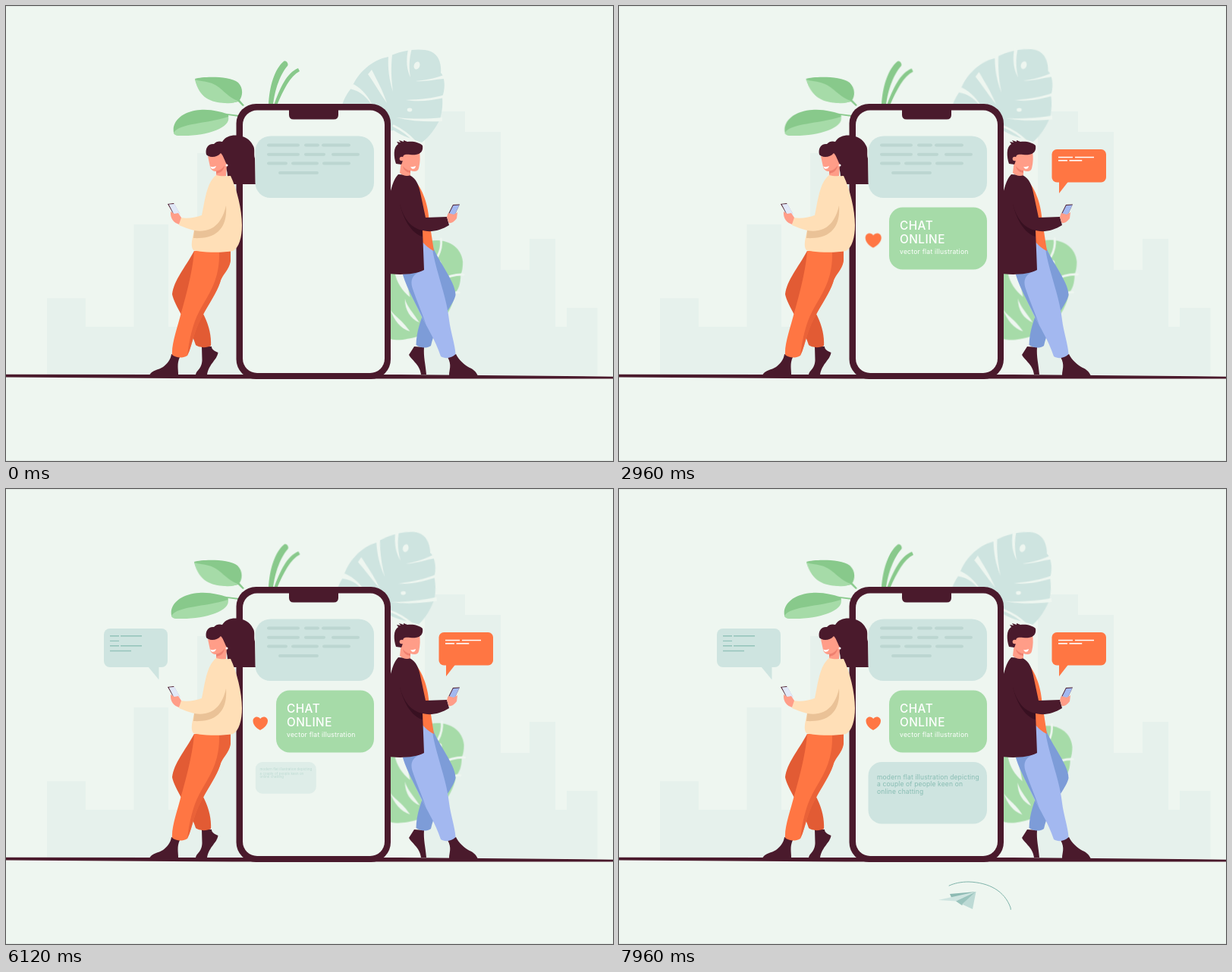
Write an HTML page without scripts that moves like this. It is 800x600 px and loops after 8 s.

```html
<!DOCTYPE html>
<html lang="en">
<head>
<meta charset="utf-8">
<title>Chat online</title>
<style>
html, body { margin: 0; width: 100%; height: 100%; overflow: hidden; background: #eef6f0; }
svg { display: block; width: 100%; height: 100%; }
text { font-family: Inter, "Open Sans", sans-serif; }

.bg { fill: #eef6f0; }
.wine { fill: #4a1a2c; }
.orange { fill: #ff7643; }
.rust { fill: #e25b34; }
.skin { fill: #ff9d88; }
.mist { fill: #cee4e0; }
.leaf { fill: #a6dba8; }
.stem { fill: #88c98b; }
.sky { fill: #a3b8f0; }
.denim { fill: #7d9cd8; }
.cut { fill: none; stroke: #eef6f0; stroke-width: 3; stroke-linecap: round; }
.bars { fill: none; stroke: #bcd6d1; stroke-width: 4; stroke-linecap: round; }

.anim, .line { animation: 8s linear infinite both; }
.monstera { transform-origin: 530px 215px; animation-name: monstera; }
.fern { transform-origin: 518px 438px; animation-name: fern; }
.leafA { transform-origin: 313px 131px; animation-name: leafA; }
.leafB { transform-origin: 306px 145px; animation-name: leafB; }
.sprout { transform-origin: 352px 130px; animation-name: sprout; }
.sayR { transform-origin: 606px 210px; animation-name: sayR; }
.sayL { transform-origin: 171px 210px; animation-name: sayL; }
.title { transform-origin: 485px 265.5px; animation-name: title; }
.note { transform-origin: 329px 360px; animation-name: note; }
.heart { transform-origin: 335px 309px; animation-name: heart; }

@keyframes monstera {
  0% { transform: rotate(0); animation-timing-function: cubic-bezier(.37,0,.63,1); }
  71% { transform: rotate(-6.3deg); animation-timing-function: cubic-bezier(.33,0,.7,.55); }
  100% { transform: rotate(-4deg); }
}
@keyframes fern {
  0% { transform: scale(.955,.985); animation-timing-function: ease-out; }
  13% { transform: none; }
  24.5% { transform: scale(.99,.997); }
  46% { transform: scale(.955,.983); }
  57.5% { transform: scale(.9,.96); animation-timing-function: ease-in-out; }
  64% { transform: scale(.9,.96); animation-timing-function: ease-in-out; }
  82% { transform: scale(.99,.995); }
  87% { transform: scale(.98,.99); }
  95% { transform: scale(.92,.966); }
  100% { transform: scale(.9,.96); }
}
@keyframes leafA {
  0%, 24.5%, 87% { transform: none; animation-timing-function: ease-in-out; }
  11%, 100% { transform: skewX(3.2deg); animation-timing-function: ease-in-out; }
  46%, 57.5% { transform: skewX(6.4deg); animation-timing-function: ease-in-out; }
}
@keyframes leafB {
  0% { transform: none; }
  11% { transform: scaleX(1.023); animation-timing-function: ease-out; }
  24.5% { transform: scaleX(1.058); animation-timing-function: ease-in-out; }
  46% { transform: scaleX(1.012); animation-timing-function: ease-out; }
  57.5%, 100% { transform: scaleX(1.035); }
}
@keyframes sprout {
  0%, 24.5% { transform: none; animation-timing-function: ease-in-out; }
  46%, 100% { transform: rotate(1.3deg); animation-timing-function: ease-in-out; }
  72% { transform: rotate(.5deg); animation-timing-function: ease-in-out; }
}
@keyframes sayR {
  0%, .5% { transform: scaleX(0); opacity: 0; animation-timing-function: cubic-bezier(.4,.5,.7,1); }
  4.5% { transform: scaleX(1.19); opacity: 1; animation-timing-function: ease-in-out; }
  8%, 100% { transform: none; opacity: 1; }
}
@keyframes sayL {
  0%, 43.5% { transform: scaleX(0); opacity: 0; animation-timing-function: cubic-bezier(.4,.5,.7,1); }
  48% { transform: scaleX(1.19); opacity: 1; animation-timing-function: ease-in-out; }
  51.5%, 100% { transform: none; opacity: 1; }
}
@keyframes title {
  0%, 19.5% { transform: scale(0); opacity: 0; animation-timing-function: cubic-bezier(.215,.61,.355,1); }
  27%, 100% { transform: none; opacity: 1; }
}
@keyframes note {
  0%, 75% { transform: scale(0); opacity: 0; animation-timing-function: cubic-bezier(.215,.61,.355,1); }
  82.5%, 100% { transform: none; opacity: 1; }
}
@keyframes heart {
  0%, 34% { transform: scale(0); animation-timing-function: ease-out; }
  38% { transform: scale(1.19); animation-timing-function: ease-in-out; }
  41%, 100% { transform: none; }
}

/* typed lines are uncovered from the left */
@keyframes r1 { 0%, 5.5% { clip-path: inset(0 100% 0 0); } 11.6%, 100% { clip-path: inset(0); } }
@keyframes r2 { 0%, 12% { clip-path: inset(0 100% 0 0); } 19%, 100% { clip-path: inset(0); } }
@keyframes l1 { 0%, 48.5% { clip-path: inset(0 100% 0 0); } 55%, 100% { clip-path: inset(0); } }
@keyframes l2 { 0%, 55% { clip-path: inset(0 100% 0 0); } 60%, 100% { clip-path: inset(0); } }
@keyframes l3 { 0%, 60% { clip-path: inset(0 100% 0 0); } 68%, 100% { clip-path: inset(0); } }
@keyframes l4 { 0%, 68% { clip-path: inset(0 100% 0 0); } 75%, 100% { clip-path: inset(0); } }
</style>
</head>
<body>
<svg viewBox="0 0 800 600">
  <rect class="bg" width="800" height="600"/>

  <!-- skyline -->
  <path fill="#e6f1ec" d="M54 487V385.500H105V423H168.500V288H214V423H252V194H320V487H552V139H605V166H652V348H690V307H724V423H739V398H779.500V487Z"/>

  <!-- plants -->
  <g class="anim monstera">
    <path class="mist" d="M442 136C444 123 450 115 456 107C464 88 482 71 504 67C521 58 546 55 560 60C572 65 574 80 573 88C579 94 579 110 575 120C576 133 574 142 572 149C567 160 558 173 548 180C538 176 522 172 511 164L460 170Z"/>
    <path class="bg" d="M484 134C477 121 467 112 453 109L458 103C470 110 479 120 484 134ZM502 128C491 112 483 98 477 90L482 84C488 96 496 110 502 128ZM510 113C505 98 503 82 504 66L509 64C507 83 508 98 510 113ZM533 94C528 84 527 72 530 57L535 56C531 70 531 82 533 94ZM540 99C553 100 564 97 577 96V91C563 96 552 98 540 99ZM527 124C546 127 562 124 578 121V117C562 122 546 123 527 124ZM514 147C535 152 555 153 575 152V147C555 149 535 149 514 147Z"/>
    <ellipse class="bg" cx="541.500" cy="78.500" rx="3.800" ry="5.200" transform="rotate(20 541.500 78.500)"/>
    <ellipse class="bg" cx="532" cy="137" rx="3.300" ry="2.400"/>
    <path class="cut" d="M511 158C523 164 532 171 538 178"/>
  </g>
  <g class="anim fern">
    <path class="leaf" d="M560 308C584 304 604 315 606 336C606 343 605 349 603 353C603 365 600 373 595 378C594 388 588 402 581 410C566 432 540 438 523 440C514 441 505 440 500 436V340Z"/>
    <path class="cut" d="M576 305C577 314 575 322 571 329M607 353C595 352 584 356 573 361M601 377C592 376 584 379 577 384"/>
    <path class="bg" d="M526 385C529 396 537 403 546 417C534 412 526 401 526 385ZM506 400C513 410 521 412 533 429C520 425 511 414 506 400ZM512 350C515 364 522 374 533 383L526 350Z"/>
    <ellipse class="bg" cx="573" cy="338" rx="3" ry="4"/>
  </g>
  <g class="anim leafA">
    <path class="stem" d="M249 96C260 93 294 92 306 101C313 108 312 118 308 124L314 131L312 132L306 126C288 131 256 126 249 96Z"/>
    <path class="leaf" d="M249 97C255 122 270 127 289 128C297 129 303 127 306 125C290 120 284 105 268 101C261 99 255 99 249 97Z"/>
  </g>
  <g class="anim leafB">
    <path class="stem" d="M221 167C218 150 236 138 256 137C272 136 283 140 291 142L307 144V146L293 144C296 154 270 169 231 171C225 171 222 170 221 167Z"/>
    <path class="leaf" d="M221 167C230 154 262 156 293 146C297 161 262 172 231 171C225 171 221 170 221 167Z"/>
  </g>
  <g class="anim sprout stem">
    <path d="M346 131C347 106 354 83 366 73C369 71 373 76 371 79C362 89 354 110 352 131Z"/>
    <path d="M353 131C361 108 370 88 385 82L387 86C374 93 366 110 357 131Z"/>
  </g>

  <!-- ground, thinner towards both ends -->
  <path class="wine" d="M0 485.700L190 486H520L800 488.700V491.600H300L0 489.400Z"/>

  <!-- man -->
  <g>
    <path class="wine" d="M538 449L551 450C550 462 553 473 554 486H547C546 479 543 474 539 470C536 466 533 464 531 460ZM582 463L593 459C597 467 604 473 611 477C616 479 620 483 621.500 487H584C584 479 588 474 582 463Z"/>
    <path class="denim" d="M552 311L561 312C565 331 593 363 592.500 381C590 396 567 416 560 448C554 452 546 451 540.500 447C541 429 547 411 554 398Z"/>
    <path class="sky" d="M549 310L561 311C563 342 580 378 584 414C586 430 592 447 592.500 459C588 464 579 466 573 462C566 440 553 421 544 402C537 385 527 370 523 354L550 346Z"/>
    <path class="denim" d="M523 354L545 350C536 355 532 361 536 373C541 388 547 401 554 421C546 404 529 374 523 354Z"/>
    <path class="orange" d="M535 227C547 236 556 259 557.500 281L564 323C559 321 553 316 548 310L541 260Z"/>
    <path class="wine" d="M517 222L532 223C541 228 544 236 546 246L553 279L581 278L584 289C573 296 560 299 549 296L551 348C540 354 520 355 505 353V252C508 239 511 228 517 222Z"/>
    <path fill="#381021" d="M519 261C524 281 534 293 549 296V304C536 301 524 283 519 261Z"/>
    <path class="skin" d="M521 203L519 220C523 224 529 225 533 223V217C539 219 543 218 544 214C546 206 546 199 545 192L524 190Z"/>
    <path fill="#ef806f" d="M523 211C526 215 530 217 533 217V220C527 219 524 216 523 211Z"/>
    <path fill="#fff" d="M533 212Q537 212.500 540 211Q539 216 535 214.500Z"/>
    <path class="wine" d="M514 208C511 199 510 186 517 182L515 179L520 180L518 177L524 179L524 177L529 179C537 178 545 180 549 184C550 191 547 195 540 196C534 197 527 194 524 197C522 200 524 204 521 209Z"/>
    <circle class="skin" cx="521.500" cy="201.500" r="2.800"/>
    <path class="wine" d="M582 276L589 262L598 261.500L591 276Z"/>
    <path class="sky" d="M583 276L589.500 263L597.500 262.500L590.500 277Z"/>
    <path class="skin" d="M581 278L583 273L590 275L595 272L594 280C591 284 587 287 583.500 286Z"/>
  </g>

  <!-- phone -->
  <rect class="wine" x="303.500" y="129" width="203.500" height="363" rx="26"/>
  <rect class="bg" x="312" y="137.500" width="187" height="346.500" rx="19"/>
  <path class="wine" d="M373 136H438V143.500Q438 149.500 432 149.500H379Q373 149.500 373 143.500Z"/>

  <!-- woman -->
  <g>
    <path class="wine" d="M264 196C262 187 267 181 274 182C277 178 282 178 285 179C289 172 297 170 304 170.500C313 171 322 176 325 183C329 188 326 195 328 201L329 235H294C291 228 293 221 290 214L280 202C274 200 268 200 264 196Z"/>
    <path class="skin" d="M266 198C272 200 279 199 283 194C287 198 288 204 291 209L290 224C285 227 280 226 277 223V218C273 218 270 216 269 212Z"/>
    <path fill="#ef806f" d="M277 217.500C282 217 286 214 288 210C288 216 283 220 277 221Z"/>
    <path fill="#fff" d="M269 211.500Q273 213 277 211Q275 216 271 214.500Z"/>
    <circle fill="#fff" cx="291" cy="210" r="1.500"/>
    <path class="wine" d="M218 459L229 463C225 472 227 478 227 486H189.500C193 480 201 480 207 476C212 472 217 467 218 459ZM258 449H271C271 453 275 455 279.500 457C278 467 268 471 265 486H250C251 480 258 479 258.500 467Z"/>
    <path class="rust" d="M248 323C236 345 221 362 219 380C222 396 243 423 250 447C255 451 265 451 270 448C271 432 266 418 260 406L285 340V323Z"/>
    <path class="orange" d="M248 323H296V336C294 349 285 353 282 365C275 385 257 406 249 431C245 443 243 453 239 461C232 465 224 464 219 460C218 445 226 424 231 404C238 379 246 350 248 323Z"/>
    <path class="rust" d="M281 324H296V336C294 349 285 353 282 365C275 385 257 406 249 431C245 443 243 453 239 461C241 443 246 418 255 402C266 381 282 363 281 324Z" opacity=".72"/>
    <path fill="#ffdfb7" d="M277 223C283 225 290 224 296 224C304 241 311 268 311 289C311 305 307 319 299 323C284 326 258 325 247 322C243 318 245 308 248 296C241 294 235 292 228 289L230 279C241 281 252 278 258 276C262 258 264 233 277 223Z"/>
    <path fill="#eac297" d="M248 296C272 300 285 286 290 263C292 289 281 308 247 306Z"/>
    <path class="wine" d="M213 261L221 260L229 274L221 275Z"/>
    <path fill="#e1e8f8" d="M214.500 261.500L222 261L230 275L222 276Z"/>
    <path class="skin" d="M217 271L222 274L227 273L231 279L228 288C222 286 216 281 217 271Z"/>
  </g>

  <!-- messages on screen -->
  <rect class="mist" x="328.500" y="171.500" width="156.500" height="81.500" rx="20"/>
  <path class="bars" d="M346 183.500h39M395 183.500h16M418 183.500h34M346 195.700h39M395 195.700h24M431 195.700h33M346 207.500h23M378 207.500h32M419 207.500h33M361 220h49"/>
  <g class="anim title" fill="#fff">
    <rect class="leaf" x="356" y="265.500" width="129" height="82" rx="18"/>
    <g font-size="15.300" font-weight="500" letter-spacing=".5">
      <text x="370" y="295">CHAT</text>
      <text x="370" y="313.300">ONLINE</text>
    </g>
    <text x="370" y="326.800" font-size="8.600" letter-spacing=".22">vector flat illustration</text>
  </g>
  <path class="anim heart orange" d="M335 318C329 315 325.500 310.500 325.500 305.500C326 299.500 333 299 335.200 303C337.500 299 344.500 299.500 345 305.500C345 310.500 341 315 335 318Z"/>
  <g class="anim note" fill="#88bdb3" font-size="8.500" letter-spacing=".15">
    <rect class="mist" x="328.500" y="360" width="156.500" height="81.500" rx="18"/>
    <text x="340" y="382.500">modern flat illustration depicting</text>
    <text x="340" y="392.300">a couple of people keen on</text>
    <text x="340" y="402">online chatting</text>
  </g>

  <!-- speech bubbles -->
  <g class="anim sayR">
    <rect class="orange" x="570.500" y="189" width="71.500" height="43.500" rx="6.500"/>
    <path class="orange" d="M580 231V247L592.500 231Z"/>
    <g fill="#fff">
      <path class="line" style="animation-name:r1" d="M579 198.500h19v2h-19zM601 198.500h25v2h-25z"/>
      <path class="line" style="animation-name:r2" d="M579 202.800h12v2h-12zM593.500 202.800h17v2h-17z"/>
    </g>
  </g>
  <g class="anim sayL">
    <rect class="mist" x="129" y="184" width="84" height="51" rx="8"/>
    <path class="mist" d="M187 234L201.500 251.500V234Z"/>
    <g fill="#95c4bb">
      <path class="line" style="animation-name:l1" d="M137 193h12v1.800h-12zM151 193h28v1.800h-28z"/>
      <path class="line" style="animation-name:l2" d="M137 199.400h12v1.800h-12z"/>
      <path class="line" style="animation-name:l3" d="M137 206h12v1.800h-12zM151 206h28v1.800h-28z"/>
      <path class="line" style="animation-name:l4" d="M137 212.600h28v1.800h-28z"/>
    </g>
  </g>

  <!-- paper plane and its trail -->
  <path id="flight" fill="none" stroke="#7fb3aa" stroke-dasharray="0 75 0 999" d="M562 634C540 616 520 590 516 552C508 530 488 519 461 518C440 518 425 526 422 536C418 550 432 547 446 541">
    <animate attributeName="stroke-dasharray" dur="8s" repeatCount="indefinite" keyTimes="0;.919;1" values="0 75 0 999;0 75 0 999;0 95 105 999"/>
  </path>
  <g>
    <animateMotion dur="8s" repeatCount="indefinite" rotate="auto" calcMode="linear" keyTimes="0;.842;.995;1" keyPoints="0;0;1;1">
      <mpath href="#flight"/>
    </animateMotion>
    <g transform="rotate(23.200) translate(-446 -541)">
      <path fill="#8dbab3" d="M436 534L470.500 531L439 541Z"/>
      <path class="mist" d="M421 542L470.500 531L444 543.500Z"/>
      <path fill="#9ac4bd" d="M444 543.500L470.500 531L452 549Z"/>
      <path fill="#bddad5" d="M452 547.500L470.500 531L466 554Z"/>
    </g>
  </g>

  <path fill="#e1e8e3" d="M0 0H800V1H0ZM0 599H800V600H0Z"/>
</svg>
</body>
</html>
```
